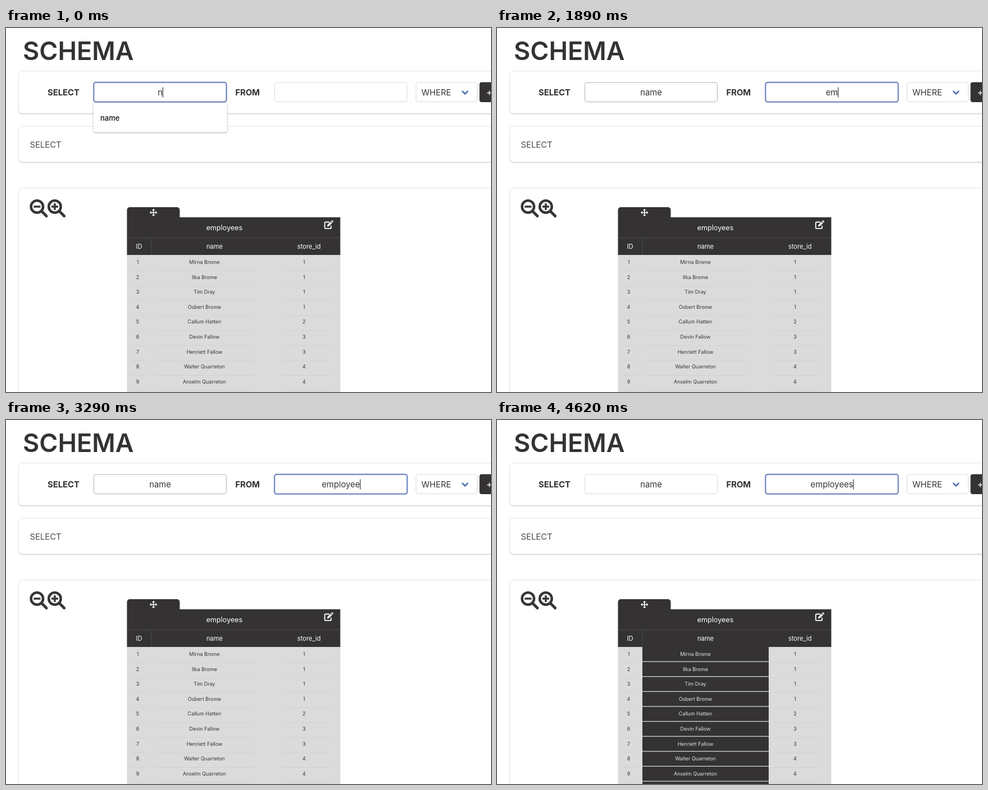
An HTML page for the animation above (4.83 s loop, 864 px wide and 648 px high).

```html
<!DOCTYPE html>
<html lang="en">
<head>
<meta charset="utf-8">
<title>Schema query</title>
<style>
html, body { margin: 0; width: 100%; height: 100%; overflow: hidden; background: #fff; }
svg { display: block; width: 100%; height: 100%; }
text { font-family: Inter, "Open Sans", sans-serif; font-size: 14.8px; fill: #363636; }
.mid { text-anchor: middle; }
.bold { font-weight: 700; fill: #2f2f2f; }
.card { fill: #fff; stroke: #e2e2e2; filter: drop-shadow(0 1px .7px rgba(0,0,0,.16)); }
.box { fill: #fff; stroke: #dbdbdb; }
.dark { fill: #343233; }
.head text { fill: #fff; font-size: 12.6px; }
.head .cols { font-size: 11.2px; }
.rows text { font-size: 9px; }
.glow { fill: none; stroke: #4a6cb3; stroke-opacity: .25; stroke-width: 4; }
.lens { fill: none; stroke: #363636; stroke-width: 72; }
</style>
</head>
<body>
<svg id="stage" viewBox="0 0 864 648">
  <text x="30" y="57" style="font-size:45px;font-weight:600;fill:#333">SCHEMA</text>

  <rect class="card" x="22.5" y="76.5" width="900" height="75.5" rx="6"/>
  <rect class="card" x="22.5" y="175" width="900" height="63.5" rx="6"/>
  <rect class="card" x="22.5" y="285" width="900" height="420" rx="6"/>

  <text class="bold" x="74" y="120">SELECT</text>
  <text class="bold" x="408.5" y="120">FROM</text>
  <text x="42.5" y="212.5" style="fill:#4a4a4a">SELECT</text>

  <rect class="box" x="730.5" y="97" width="109" height="34.5" rx="3.5"/>
  <text x="740" y="120">WHERE</text>
  <path d="M812.5 112l5.3 5.3 5.3-5.3" fill="none" stroke="#3e63aa" stroke-width="2.4"/>
  <rect class="dark" x="843.5" y="96.5" width="60" height="35.5" rx="4"/>
  <path d="M857 115.5h8M861 111.5v8" stroke="#fff" stroke-width="1.3"/>

  <g id="inputs"></g>
  <g id="menu">
    <path d="M156 133h238v48.500a4 4 0 0 1-4 4h-230a4 4 0 0 1-4-4z" fill="#fff"
      style="filter:drop-shadow(0 1px 1.500px rgba(0,0,0,.35))"/>
    <text x="168" y="164.500" style="font-size:13px;font-weight:500;fill:#111">name</text>
  </g>

  <g transform="translate(42.300 305) scale(.0625)">
    <g class="lens"><circle cx="208" cy="208" r="172"/><path d="M340 340L476 476" stroke-width="78" stroke-linecap="round"/></g>
    <path d="M112 208h192" stroke="#363636" stroke-width="56"/>
  </g>
  <g transform="translate(73.900 305) scale(.0625)">
    <g class="lens"><circle cx="208" cy="208" r="172"/><path d="M340 340L476 476" stroke-width="78" stroke-linecap="round"/></g>
    <path d="M112 208h192M208 112v192" stroke="#363636" stroke-width="56"/>
  </g>

  <rect x="215.500" y="403" width="380" height="245" fill="#dbdbdb"/>
  <g class="rows" id="rows"></g>

  <g class="head">
    <path class="dark" d="M215.500 404V324a5 5 0 0 1 5-5h84a5 5 0 0 1 5 5v13h286v67z"/>
    <path d="M215.500 373.500h380M259 374v30" stroke="#555354" stroke-width=".8"/>
    <text class="mid" x="389" y="360.200">employees</text>
    <g class="mid">
      <text x="237" y="393" style="font-size:11.200px">ID</text>
      <text x="371.500" y="393" style="font-size:11.200px">name</text>
      <text x="539.700" y="393" style="font-size:11.200px">store_id</text>
    </g>
    <g transform="translate(262.700 328.500)" fill="#fff">
      <path d="M-5 0h10M0-5v10" stroke="#fff" stroke-width="1.700"/>
      <path id="tip" d="M-2.800-4L0-6.700 2.800-4z"/>
      <use href="#tip" transform="rotate(90)"/>
      <use href="#tip" transform="rotate(180)"/>
      <use href="#tip" transform="rotate(270)"/>
    </g>
    <path d="M576 345.500h-7a1.200 1.200 0 0 0-1.200 1.200v9a1.200 1.200 0 0 0 1.200 1.200h9a1.200 1.200 0 0 0 1.200-1.200v-4" fill="none" stroke="#fff" stroke-width="1.800"/>
    <path d="M572 353.500l.5-3 5.700-5.700 2.600 2.600-5.800 5.700zM579 344l1.200-1.200q.8-.6 1.500 0l1.100 1.100q.6.700 0 1.500l-1.200 1.200z" fill="#fff"/>
  </g>
</svg>
<script>
const LOOP = 4830;
const NS = "http://www.w3.org/2000/svg";
const $ = id => document.getElementById(id);

function add(parent, tag, attrs, text) {
  const el = document.createElementNS(NS, tag);
  for (const k in attrs) el.setAttribute(k, attrs[k]);
  if (text !== undefined) el.textContent = text;
  return parent.appendChild(el);
}

const people = [
  ["Mirna Brome", 1], ["Ilka Brome", 1], ["Tim Dray", 1],
  ["Osbert Brome", 1], ["Callum Hatten", 2], ["Devin Fallow", 3],
  ["Henriett Fallow", 3], ["Walter Quarreton", 4], ["Anselm Quarreton", 4]
];
const ROW = 26.62, TOP = 403.5;

const rows = $("rows");
for (let i = 1; i < 10; i++) {
  const y = TOP + i * ROW + 2;
  add(rows, "path", { d: `M222 ${y}h28M264 ${y}h180M490 ${y}h85`, stroke: "#d0d0d0", "stroke-width": 0.8 });
}
const column = add(rows, "g", {});
add(column, "rect", { x: 259, y: TOP, width: 225, height: 245, class: "dark" });
for (let i = 1; i < 10; i++)
  add(column, "rect", { x: 259, y: TOP + i * ROW - 0.7, width: 225, height: 1.3, fill: "#d6d6d6" });

const names = people.map(([name, store], i) => {
  const y = 420 + i * ROW;
  const cell = (x, s) => add(rows, "text", { x, y, class: "mid" }, s);
  cell(234.5, i + 1);
  cell(531, store);
  return cell(353.5, name);
});

function makeInput(x) {
  const g = add($("inputs"), "g", {});
  const frame = { x, y: 97, width: 236, height: 34.5, rx: 3.5 };
  const glow = add(g, "rect", { ...frame, class: "glow" });
  const box = add(g, "rect", { ...frame, class: "box" });
  const mid = x + 118;
  const label = add(g, "text", { x: mid, y: 120, class: "mid" });
  const caret = add(g, "rect", { y: 105.5, width: 1.1, height: 18, fill: "#222" });
  return (text, border, focus, blinkOn) => {
    if (label.textContent !== text) label.textContent = text;
    glow.style.display = focus ? "" : "none";
    box.style.stroke = focus ? "#4a69ad" : border;
    box.style.strokeWidth = focus ? 1.5 : 1;
    caret.style.display = focus && blinkOn ? "" : "none";
    caret.setAttribute("x", mid + (text ? label.getComputedTextLength() / 2 : 0));
  };
}
const setFields = makeInput(156.5);
const setTable = makeInput(478.5);

// Time of each key press while typing the table name.
const keys = [1750, 1890, 2030, 2240, 2380, 2590, 2800, 3080, 3360];
const FOCUS = 840;

function draw(t) {
  const typed = "employees".slice(0, keys.filter(k => t >= k).length);
  const second = t >= FOCUS;
  const caretOff = (t >= 1330 && t < 1750) || (t >= 3850 && t < 4410);
  setFields(t < 350 ? "n" : "name", second && t < 4620 ? "#b0b0b0" : "#dbdbdb", !second, true);
  setTable(typed, "#dbdbdb", second, !caretOff);

  $("menu").style.opacity = t < 350 ? 1 : t < 420 ? 0.5 : 0;
  const matched = typed === "employees";
  column.style.display = matched ? "" : "none";
  for (const el of names) el.style.fill = matched ? "#e4e4e4" : "#363636";
}

const start = performance.now();
function tick() {
  draw((performance.now() - start) % LOOP);
  requestAnimationFrame(tick);
}
tick();
</script>
</body>
</html>
```
